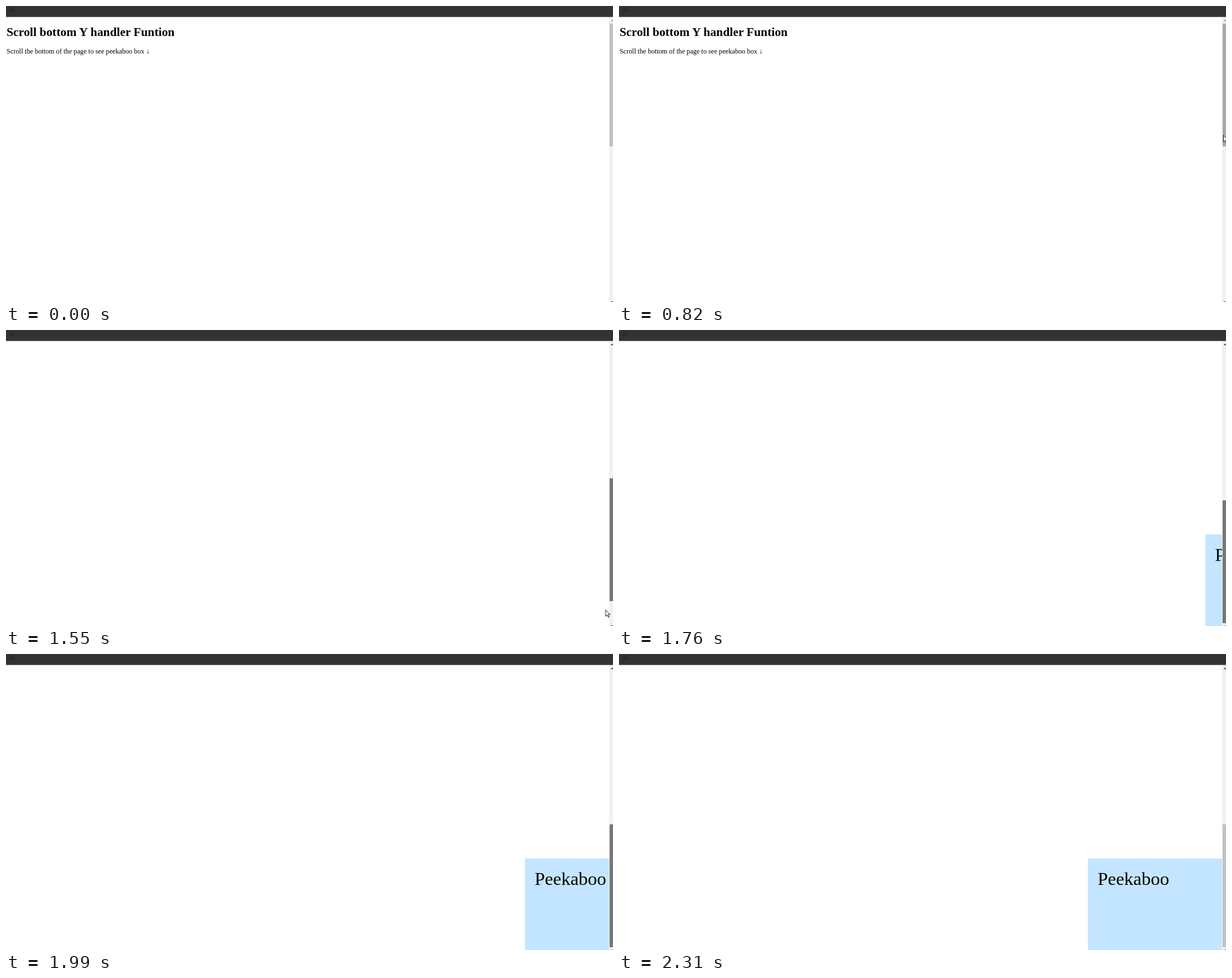
An HTML page that plays this animation: 1071x523 px, repeating every 3.31 s.

```html
<!DOCTYPE html>
<html lang="en">
<head>
<meta charset="utf-8">
<title>Peekaboo scroll</title>
<style>
  html, body { margin: 0; width: 100%; height: 100%; overflow: hidden; background: #fff; }
  svg { display: block; width: 1071px; height: 523px; }
  text { font-family: "Liberation Serif", "Times New Roman", serif; white-space: pre; }
</style>
</head>
<body>
<svg viewBox="0 0 1071 523">
  <rect width="1071" height="523" fill="#fff"/>
  <g id="page">
    <text x="1" y="53" font-size="21.35" font-weight="bold">Scroll bottom Y handler Funtion</text>
    <text x="1" y="84" font-size="12.15">Scroll the bottom of the page to see peekaboo box ↓</text>
  </g>
  <g id="box">
    <rect y="361.3" width="237" height="162" fill="#c4e5ff"/>
    <text x="16.9" y="408" font-size="32.5">Peekaboo</text>
  </g>
  <rect x="1064" y="19" width="7" height="504" fill="#f1f1f1"/>
  <rect id="thumb" x="1065" y="31" width="6" height="217"/>
  <path id="up" d="M1066.5 27L1069.5 24L1072.5 27Z"/>
  <path id="down" d="M1066.5 522L1069.5 525L1072.5 522Z"/>
  <rect width="1071" height="19.4" fill="#333"/>
  <circle cx="10.7" cy="6.9" r="5.4" fill="#292b3b"/>
  <path id="cursor" d="M0 0V11.3L2.6 8.9L4.5 13.2L6.3 12.4L4.4 8.2H8Z" fill="#fff" stroke="#000" stroke-width=".9"/>
</svg>
<script>
const LOOP = 3310;
const EDGE = 1064, BOX_WIDTH = 236.5;
const MAX_THUMB = 270, PAGE_PER_THUMB = 2.32;
const SLIDE_START = 1588, SLIDE_TIME = 700;
const IDLE = '#c1c1c1', HOVER = '#a8a8a8', PRESSED = '#787878';

// Pointer and scrollbar: time, thumb colour, thumb offset, pointer tip (absent when outside)
const steps = [
  [0, IDLE, 0],
  [70, IDLE, 0, 1014.5, 508],
  [150, IDLE, 0, 1032, 430],
  [230, IDLE, 0, 1049, 345],
  [300, IDLE, 0, 1062, 272.5],
  [380, IDLE, 0],
  [530, HOVER, 0, 1067, 237.5],
  [600, HOVER, 0, 1067, 229.5],
  [750, HOVER, 0, 1067, 229],
  [820, HOVER, 0, 1066.5, 228.5],
  [1230, PRESSED, 0, 1066.5, 228.5],
  [1300, PRESSED, 20, 1066, 262],
  [1380, PRESSED, 80, 1064, 335],
  [1470, PRESSED, 155, 1061, 420],
  [1550, PRESSED, 231, 1058, 494.5],
  [1620, PRESSED, MAX_THUMB, 1057, 517],
  [1660, PRESSED, MAX_THUMB],
  ...[1760, 1840, 1910, 1990, 2070].map(t => [t, PRESSED, MAX_THUMB]),
  ...[2150, 2240, 2310].map(t => [t, IDLE, MAX_THUMB])
];

const el = id => document.getElementById(id);
const move = (id, x, y) => el(id).setAttribute('transform', `translate(${x} ${y})`);
const arrowColor = enabled => enabled ? '#505050' : '#a3a3a3';

// cubic-bezier(.42, 0, .58, 1)
function easeInOut(x) {
  if (x <= 0) return 0;
  if (x >= 1) return 1;
  let low = 0, high = 1, s = .5;
  for (let i = 0; i < 20; i++) {
    s = (low + high) / 2;
    const bx = 1.26 * s * (1 - s) ** 2 + 1.74 * s * s * (1 - s) + s ** 3;
    if (bx < x) low = s; else high = s;
  }
  return s * s * (3 - 2 * s);
}

function render(time) {
  const [t, color, offset, x, y] = steps.findLast(step => step[0] <= time);
  move('page', 0, -offset * PAGE_PER_THUMB);
  move('thumb', 0, offset);
  el('thumb').setAttribute('fill', color);
  el('up').setAttribute('fill', arrowColor(offset > 0));
  el('down').setAttribute('fill', arrowColor(offset < MAX_THUMB));
  move('box', EDGE - BOX_WIDTH * easeInOut((t - SLIDE_START) / SLIDE_TIME), 0);
  el('cursor').setAttribute('visibility', x === undefined ? 'hidden' : 'visible');
  if (x !== undefined) move('cursor', x, y);
}

const start = performance.now();
function tick() {
  render((performance.now() - start) % LOOP);
  requestAnimationFrame(tick);
}
tick();
</script>
</body>
</html>
```
